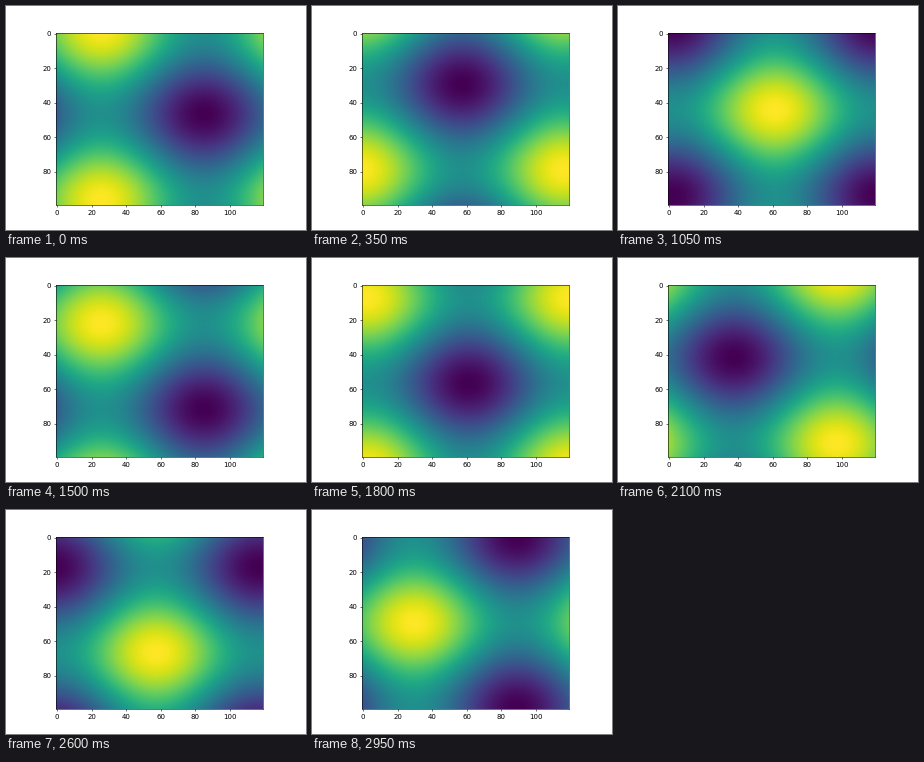
A matplotlib script that plays this animation: 300x224 px, repeating every 3000 ms.

```python
import numpy as np
import matplotlib.pyplot as plt
from matplotlib.animation import FuncAnimation

DPI = 50
FRAMES = 60
INTERVAL = 50

x = np.linspace(0, 2 * np.pi, 120)
y = np.linspace(0, 2 * np.pi, 100).reshape(-1, 1)


def wave(i):
    """Height field after i + 1 phase steps along both axes."""
    step = i + 1
    return np.sin(x + step * np.pi / 15) + np.cos(y + step * np.pi / 20)


fig, ax = plt.subplots(figsize=(300 / DPI, 224 / DPI), dpi=DPI)
im = ax.imshow(wave(0), cmap="viridis")


def update(i):
    im.set_data(wave(i))
    im.autoscale()
    return (im,)


ani = FuncAnimation(fig, update, frames=FRAMES, interval=INTERVAL,
                    repeat=True, repeat_delay=0, blit=False)
plt.show()
```
